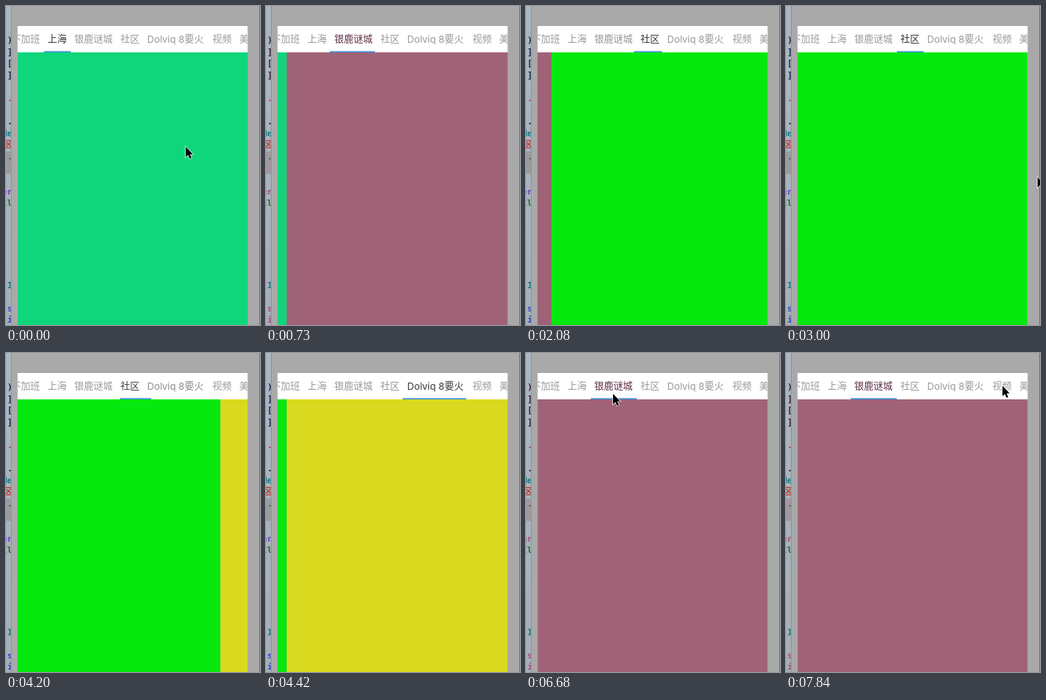
These frames come from a looping animation (318x399 px, 8000 ms). An HTML page:

```html
<!DOCTYPE html>
<html lang="zh">
<head>
<meta charset="utf-8">
<title>Tab pager</title>
<style>
  html, body { margin: 0; width: 100%; height: 100%; overflow: hidden; background: #a9a9a9; }
  svg { display: block; width: 100%; height: 100%; }
  #tabs { font: 12px Inter, "Noto Sans CJK SC", "Noto Sans CJK", sans-serif; }
  #code { font: bold 11px "DejaVu Sans Mono", "Noto Sans CJK SC", monospace; text-anchor: end; }
  #band { fill: #9b9c9d; }
  .plain { fill: #1d2c50; }
  .type { fill: #177f86; }
  .string { fill: #c33b32; }
  .comment { fill: #207a20; }
  .keyword { fill: #7040c8; }
  .value { fill: #3048c8; }
  /* Tints beside the plum page */
  .warm #band { fill: #a498a0; }
  .warm .plain { fill: #3c2338; }
  .warm .keyword, .warm .value { fill: #a85078; }
</style>
</head>
<body>
<svg id="stage" viewBox="0 0 318 399">
  <defs>
    <clipPath id="screen"><rect x="14.5" y="25" width="288" height="374"/></clipPath>
    <clipPath id="gutter"><rect width="7" height="399"/></clipPath>
    <linearGradient id="editor" x2="0" y2="1">
      <stop offset="0" stop-color="#abb7c2"/>
      <stop offset="1" stop-color="#a7b0b9"/>
    </linearGradient>
  </defs>
  <rect width="318" height="399" fill="#a9a9a9"/>
  <g clip-path="url(#gutter)">
    <rect width="7" height="399" fill="url(#editor)"/>
    <rect id="band" y="182" width="7" height="28"/>
    <g id="code"></g>
    <rect x="6" width="1" height="399" fill="#8e9499"/>
  </g>
  <rect x="317" width="1" height="399" fill="#777"/>
  <g clip-path="url(#screen)">
    <g id="pages"></g>
    <rect x="14" y="25" width="289" height="33" fill="#fff"/>
    <g id="tabs"></g>
    <rect id="underline" y="56.5" height="1.5" fill="#3b8fdc"/>
  </g>
  <path id="cursor" d="M0 0V13L3 10.2 5 15 7.2 14 5.2 9.4H9Z" stroke="#fff" stroke-width="1.2" paint-order="stroke"/>
</svg>
<script>
const LOOP = 8000, PAGE_LEFT = 14.5, PAGE_WIDTH = 288;
const $ = id => document.getElementById(id);
const mix = (a, b, k) => a + (b - a) * k;
const clamp = k => Math.min(1, Math.max(0, k));

function set(el, attrs) {
  for (const key in attrs) el.setAttribute(key, attrs[key]);
  return el;
}

function add(parent, tag, attrs, text = '') {
  const el = document.createElementNS('http://www.w3.org/2000/svg', tag);
  el.textContent = text;
  return parent.appendChild(set(el, attrs));
}

const pages = ['#10d67b', '#a06277', '#06e90e', '#d9d91f'].map(fill =>
  add($('pages'), 'rect', { y: 58, width: PAGE_WIDTH, height: 341, fill }));

// Tabs sit side by side; widths are counted in full-width characters.
const EM = 12, GAP = 9.6;
let x = 6.4;
const tabs = [
  ['不加班', 3], ['上海', 2], ['银鹿谜城', 4], ['社区', 2],
  ['Dolviq 8要火', 6], ['视频', 2], ['美食', 2]
].map(([label, chars]) => {
  const el = add($('tabs'), 'text', { x, y: 46, fill: '#999' }, label);
  const left = x - GAP / 2 + .3;
  x += chars * EM + GAP;
  return { el, left };
});
const pageTabs = tabs.slice(1);

// Line ends that show at the edge of the editor: line number, text, kind
[
  [0, ')', 'plain'], [1, ']', 'plain'], [2, '[', 'plain'], [3, ']', 'plain'],
  [5, '.', 'string'], [7, '.', 'plain'], [8, 'Me', 'type'], [9, '区', 'string'],
  [10, '.', 'comment'], [13, 'er', 'keyword'], [14, 'll', 'comment'],
  [21, 'I', 'type'], [23, 's', 'value'], [24, 'i', 'value']
].forEach(([line, text, kind]) =>
  add($('code'), 'text', { x: 8, y: 46 + line * 14.6, class: kind }, text));

// Each swipe moves on by one page: a dragged start, then a soft landing.
const swipes = [[250, 896], [1692, 2240], [4133, 4520]];
const TAP_TIME = 6680, TAPPED_PAGE = 1;
const swipeEase = k => 1 - (1 - k * k) ** 4;

function pagePosition(t) {
  if (t >= TAP_TIME) return TAPPED_PAGE;
  return swipes.reduce((sum, [start, end]) =>
    sum + swipeEase(clamp((t - start) / (end - start))), 0);
}

// Visible stretches of the pointer: [time, x, y]
const pointerRuns = [
  [[0, 225, 176], [250, 225, 176]],
  [[1110, 40, 182], [1692, 236, 180]],
  [[2600, 60, 184], [3000, 315, 214], [3390, 315, 214], [4133, 250, 188]],
  [[5240, 40, 174], [5600, 103, 70], [5960, 109, 59], [6260, 109, 51],
   [7080, 109, 51], [7840, 271, 41], [LOOP, 271, 41]]
];

function drawPager(position) {
  pages.forEach((page, i) => page.setAttribute('x', PAGE_LEFT + (i - position) * PAGE_WIDTH));

  const i = Math.floor(position);
  const edge = n => mix(pageTabs[n].left, pageTabs[n + 1].left, position - i);
  set($('underline'), { x: edge(i), width: edge(i + 1) - edge(i) });

  const warm = Math.abs(position - 1) < .1;
  $('stage').classList.toggle('warm', warm);
  const activeColor = warm ? [92, 44, 68] : [51, 51, 51];
  pageTabs.forEach(({ el }, n) => {
    const focus = clamp(1 - Math.abs(position - n));
    el.setAttribute('fill', `rgb(${activeColor.map(c => Math.round(mix(153, c, focus)))})`);
  });
}

function drawPointer(t) {
  const run = pointerRuns.find(keys => t >= keys[0][0] && t < keys[keys.length - 1][0]);
  $('cursor').setAttribute('visibility', run ? 'visible' : 'hidden');
  if (!run) return;
  const next = run.findIndex(key => key[0] > t);
  const [t0, x0, y0] = run[next - 1], [t1, x1, y1] = run[next];
  const k = (t - t0) / (t1 - t0);
  $('cursor').setAttribute('transform', `translate(${mix(x0, x1, k)} ${mix(y0, y1, k)})`);
}

const start = performance.now();
function frame() {
  const t = (performance.now() - start) % LOOP;
  drawPager(pagePosition(t));
  drawPointer(t);
  requestAnimationFrame(frame);
}
frame();
</script>
</body>
</html>
```
